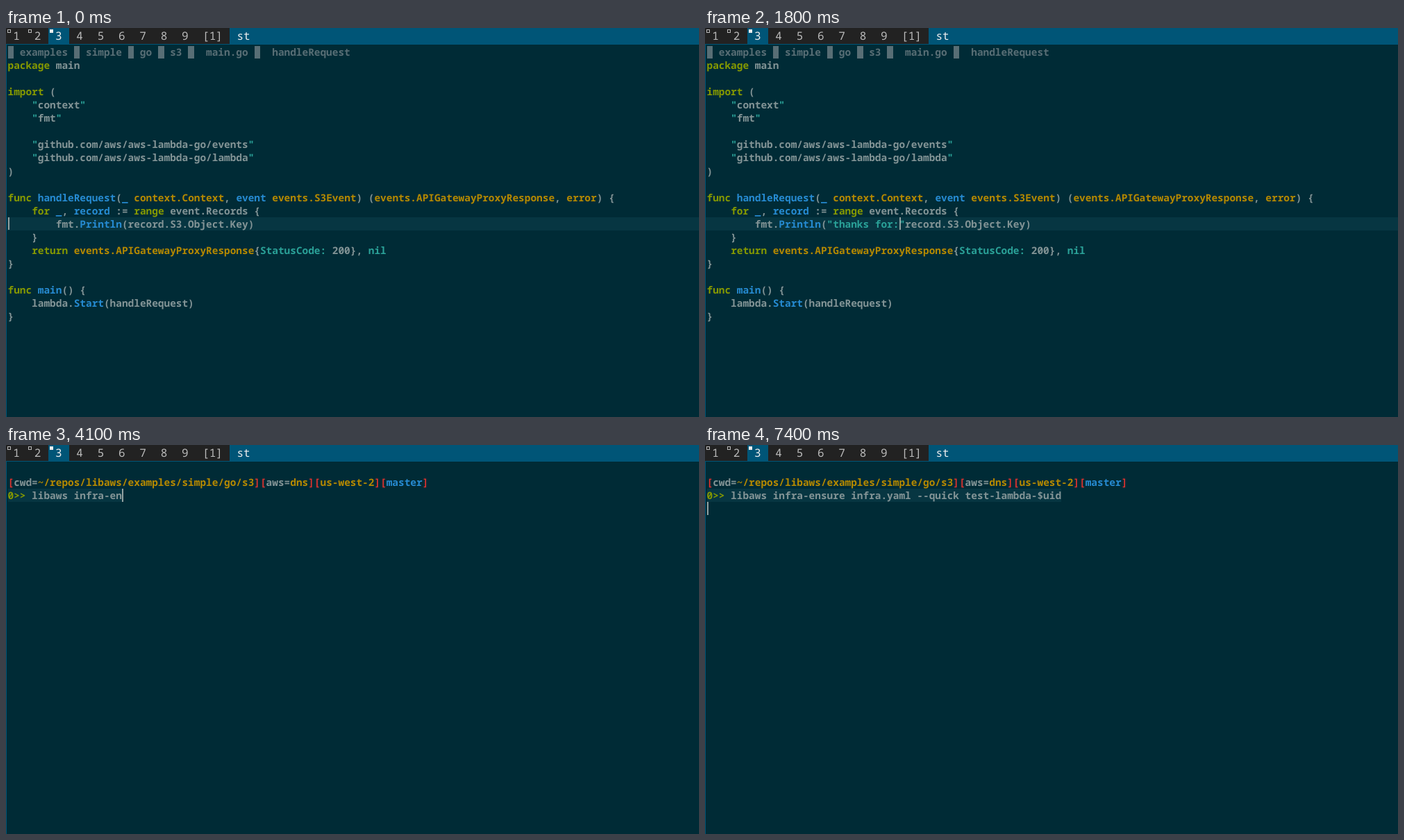
Recreate the animation shown at these times as an HTML page. Size 998 by 561 pixels, loop 8000 ms.

```html
<!DOCTYPE html>
<html lang="en">
<head>
<meta charset="utf-8">
<title>Terminal session</title>
<style>
  html, body { margin: 0; width: 100%; height: 100%; overflow: hidden; background: #002b36; }
  body { position: relative; text-rendering: geometricPrecision; }
  div, #bar span, .blk { position: absolute; }
  #bar { left: 0; top: 0; width: 100%; height: 23px; background: #222; color: #bbb;
    font: 300 16px/23px "Noto Sans Mono", monospace; }
  #bar span { top: 0; height: 23px; text-align: center; white-space: pre; }
  #bar .on { background: #057; color: #eee; }
  #bar i { position: absolute; left: 2px; top: 2px; width: 5px; height: 5px;
    box-sizing: border-box; border: 1px solid #bbb; }
  #bar .on i { background: #eee; border-color: #eee; }
  #edge { left: 0; top: 23px; width: 100%; bottom: 0; box-sizing: border-box;
    border: solid #057; border-width: 1px 0 0 1px; }
  .row { left: 2.5px; height: 19.06px; white-space: pre; color: #839496;
    font: 600 14.43px/21px "Noto Sans Mono", monospace; }
  .blk { top: 1px; width: 8.6px; height: 18px; background: #586e75; }
  #line, #typed, #match { background: #073642; height: 19px; }
  #cursor { width: 2px; height: 18.5px; background: #93a1a1; }
  .g { color: #859900 } .b { color: #268bd2 } .c { color: #2aa198 }
  .y { color: #b58900 } .r { color: #dc322f } .d { color: #586e75 }
</style>
</head>
<body>
<div id="bar"></div>
<div id="edge"></div>
<div id="editor"><div id="line"></div><div id="match"></div></div>
<div id="shell"><div id="typed"></div></div>
<div id="cursor"></div>
<script>
const CW = 8.66, RH = 19.06, LOOP = 8000;
const $ = id => document.getElementById(id);
const colX = c => 2.5 + c * CW;
const rowY = r => 25 + r * RH;

// «gtext» paints text in the colour class g
const paint = s => s.replace(/&/g, '&amp;').replace(/</g, '&lt;')
  .replace(/«(\w)([^»]*)»/g, '<span class="$1">$2</span>');

function addRow(parent, r, text) {
  const el = document.createElement('div');
  el.className = 'row';
  el.style.top = rowY(r) + 'px';
  el.innerHTML = paint(text);
  parent.append(el);
  return el;
}

function place(el, col, row, cols) {
  el.style.left = colX(col) + 'px';
  el.style.top = rowY(row) + 'px';
  if (cols !== undefined) el.style.width = cols * CW + 'px';
}

// status bar
const TAG = 30.33;
const addTag = (x, w, text, cls, mark) => {
  $('bar').insertAdjacentHTML('beforeend',
    `<span class="${cls}" style="left:${x}px;width:${w}px">${mark ? '<i></i>' : ''}${text}</span>`);
};
for (let i = 1; i <= 9; i++) addTag((i - 1) * TAG, TAG, i, i === 3 ? 'on' : '', i < 4);
addTag(273, 49, '[1]', '');
addTag(322, 676, 'st', 'on');
const title = $('bar').lastChild;
title.style.textAlign = 'left';
title.style.textIndent = '10.5px';

// editor
const code = [
  '',
  '«gpackage» main',
  '',
  '«gimport» (',
  '    «c"»context«c"»',
  '    «c"»fmt«c"»',
  '',
  '    «c"»github.com/aws/aws-lambda-go/events«c"»',
  '    «c"»github.com/aws/aws-lambda-go/lambda«c"»',
  ')',
  '',
  '«gfunc» «bhandleRequest»(«b_» «ycontext.Context», «bevent» «yevents.S3Event») («yevents.APIGatewayProxyResponse», «yerror») {',
  '    «gfor» «b_», «brecord» := «grange» event.Records {',
  '',
  '    }',
  '    «greturn» «yevents.APIGatewayProxyResponse»{«cStatusCode:» 200}, «cnil»',
  '}',
  '',
  '«gfunc» «bmain»() {',
  '    lambda.«bStart»(handleRequest)',
  '}'
];
const editor = $('editor'), shell = $('shell');
const rows = code.map((s, r) => addRow(editor, r, s));
const editRow = rows[13];

const crumbs = [[0, 2, 'examples'], [11, 13, 'simple'], [20, 22, 'go'],
  [25, 27, 's3'], [30, 33, 'main.go'], [41, 44, 'handleRequest']];
let path = '';
for (const [, col, name] of crumbs) path = path.padEnd(col) + name;
rows[0].innerHTML = paint(`«d${path}»`);
for (const [col] of crumbs)
  rows[0].insertAdjacentHTML('beforeend', `<i class="blk" style="left:${col * CW}px"></i>`);

$('line').style.cssText = `left:1px;width:997px;top:${rowY(13)}px`;
place($('match'), 11, 12, 6);

// shell
addRow(shell, 1, '«r[»cwd=«y~/repos/libaws/examples/simple/go/s3»«r][»aws=«ydns»«r][»«yus-west-2»«r][»«bmaster»«r]»');
const inputRow = addRow(shell, 2, '');
const command = 'libaws infra-ensure infra.yaml --quick test-lambda-$uid';

// [time, cursor column, inserted text, symbol highlighted]
const said = '"thanks for:"';
const edits = [
  [0, 0, ''], [100, 11, ''], [300, 12, ''], [400, 19, ''], [500, 20, ''], [600, 20, '', 1],
  [700, 21, '"'], [800, 22, '""'], [900, 21, '""'],
  ...[[1000, 2], [1100, 3], [1200, 4], [1300, 5], [1400, 6], [1500, 8], [1600, 10], [1800, 11]]
    .map(([t, n]) => [t, 21 + n, said.slice(0, n + 1) + '"']),
  [2000, 33, said], [2100, 34, said + ','], [2200, 35, said + ', '], [2300, 35, said + ', ', 1]
];

// [start time, cursor columns reached at 100 ms intervals]
const typing = [
  [2500, 4], [2900, 5, 7, 9], [3300, 10], [3500, 11], [3700, 14],
  [3900, 16, 17, 19, 20, 21], [4500, 24], [4700, 25, 35],
  [5200, 36, 37, 39, 40, 42, 43, 45, 47, 48],
  [6100, 49, 50, 51, 52, 54, 55], [6800, 56], [7000, 57, 58, 59]
].flatMap(([t, ...cols]) => cols.map((c, i) => [t + i * 100, c]));

const at = (steps, t) => steps.filter(s => s[0] <= t).pop();

function drawEditor(t) {
  const [, col, text, lit] = at(edits, t);
  const parts = text.match(/^("[^"]*"?)?(.*)$/);
  editRow.innerHTML = paint(`        fmt.«bPrintln»(«c${parts[1] || ''}»${parts[2]}record.S3.Object.Key)`);
  $('match').style.visibility = lit ? 'inherit' : 'hidden';
  place($('cursor'), col, 13);
}

function drawShell(t) {
  const [, col] = at(typing, t);
  inputRow.innerHTML = paint('«g0>>» ' + command.slice(0, col - 4));
  place($('typed'), 0, 2, col);
  if (t < 7400) place($('cursor'), col, 2);
  else place($('cursor'), 0, 3);
}

function draw(t) {
  const editing = t < 2500;
  editor.style.visibility = editing ? 'visible' : 'hidden';
  shell.style.visibility = editing ? 'hidden' : 'visible';
  (editing ? drawEditor : drawShell)(t);
}

const start = performance.now();
function tick() {
  draw((performance.now() - start) % LOOP);
  requestAnimationFrame(tick);
}
tick();
</script>
</body>
</html>
```
